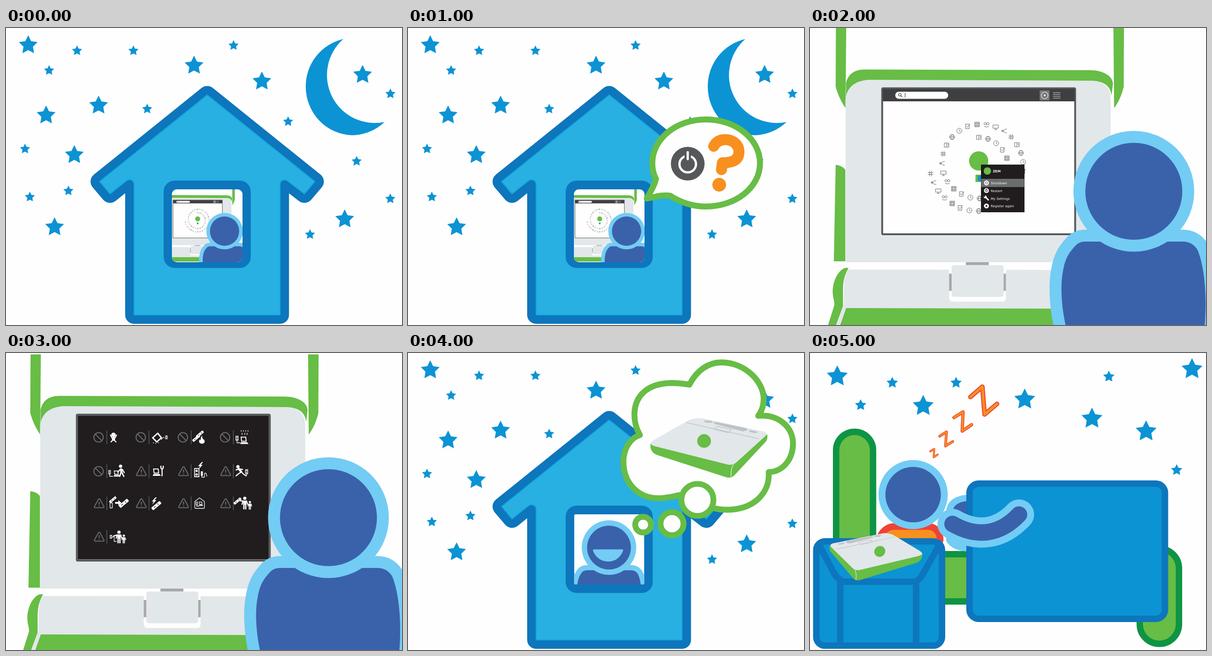
An HTML page for the animation above (6000 ms loop, 864 px wide and 648 px high).

```html
<!DOCTYPE html>
<html lang="en">
<head>
<meta charset="utf-8">
<title>Shutting down at bedtime</title>
<style>
html, body { margin: 0; width: 100%; height: 100%; overflow: hidden; background: #fefefe; }
svg { display: block; width: 100vw; height: 100vh; }
.layer { display: none; }
.line { fill: none; stroke-linecap: round; stroke-linejoin: round; }
.glyph { fill: none; stroke: #64666a; stroke-width: 1; }
.pict { fill: #fff; stroke: none; }
.pict .line { fill: none; stroke: #fff; stroke-width: 1.3; }
.sign { fill: none; stroke: #6b6c6f; stroke-width: 2.1; stroke-linejoin: round; }
.menu text { font: 7.05px "DejaVu Sans", sans-serif; fill: #fff; }
.menu .user { font-weight: bold; }
</style>
</head>
<body>
<svg id="stage" viewBox="0 0 864 648" xmlns="http://www.w3.org/2000/svg"></svg>
<script>
const C = {
  paper: '#fefefe', sky: '#0c93d4', deep: '#0d76bc', wall: '#27b0e1', edge: '#0fa5de',
  green: '#67bd45', leaf: '#0e9444', shell: '#e2e7ea', metal: '#a6a8ab', steel: '#55585b',
  skin: '#3a62ab', halo: '#73ccf4', orange: '#f7901e', red: '#ef4238', black: '#211d1e'
};

const path = (d, fill, stroke = 'none', w = 0) =>
  `<path d="${d}" fill="${fill}" stroke="${stroke}" stroke-width="${w}" stroke-linejoin="round" stroke-linecap="round"/>`;
const circle = (x, y, r, fill, stroke = 'none', w = 0) =>
  `<circle cx="${x}" cy="${y}" r="${r}" fill="${fill}" stroke="${stroke}" stroke-width="${w}"/>`;
const box = (x, y, w, h, r, fill, stroke = 'none', sw = 0) =>
  `<rect x="${x}" y="${y}" width="${w}" height="${h}" rx="${r}" fill="${fill}" stroke="${stroke}" stroke-width="${sw}"/>`;
const move = (x, y, body, more = '') => `<g transform="translate(${x} ${y}) ${more}">${body}</g>`;
const line = (d, attrs = '') => `<path class="line" d="${d}" ${attrs}/>`;

// Stars
function star([x, y], r) {
  let points = '';
  for (let i = 0; i < 10; i++) {
    const a = i * Math.PI / 5, k = i % 2 ? r * .5 : r;
    points += `${(x + k * Math.sin(a)).toFixed(1)},${(y - k * Math.cos(a)).toFixed(1)} `;
  }
  return `<polygon points="${points}" fill="${C.sky}"/>`;
}
const stars = (list, r) => list.map(p => star(p, r)).join('');

const nightStars =
  stars([[48.5,37.4],[410.3,81.9],[558.3,116.5],[778,102.1],[202,169],[87.5,190.5],[149,277],[106,434.5],[739,417.3]], 21.6) +
  stars([[155,49.7],[94,92.7],[278,49.7],[496.5,38.2],[308,176.8],[615.5,204.3],[838.7,143.7],[765,290.8],
         [838.5,372.6],[663.3,450.6],[41.5,263.9],[136.2,355.4],[52,368.6]], 11.6);
const bedStars =
  stars([[59.5,51],[247,115.5],[468.5,101.5],[615.2,143.2],[733.3,171],[833.5,35.3]], 24) +
  stars([[110.5,113.7],[179.5,65],[318.7,65],[652,51.6],[800,255.5]], 13);

// House
const housePath = 'M439 146L674 335L651 362L616 335C608 328 598 332 598 342V626H279.5V342C279.5 332 270 328 262 334L227 362L204 335Z';
const house = path(housePath, C.deep, C.deep, 39) + path(housePath, C.wall, C.edge, 2) +
  box(344, 333, 190, 190.5, 24, C.deep);
const moon = path('M736 24A106 106 0 0 0 654 128A104 106 0 0 0 756 234A104 104 0 0 0 826 205A104.5 104.5 0 0 1 736 24Z', C.sky);

// Laptop seen from the front
const laptop =
  path('M56.5 0H79L77.5 175C69 162 61 147 56 128Z', C.green) +
  path('M662 0H685L684.5 128C680 147 673 162 663.5 175Z', C.green) +
  path('M56 298.5Q70 300 77 309V509H52Z', C.green) +
  path('M77.5 511V160C78 130 95 113 130 113L610 115C640 116 656 125 656 160V511Z', C.shell) +
  path('M78.5 151V120C83 103 94 90.5 120 90.5L610 92C640 92 661 105 661 122L658 147C655 125 640 115 610 115L130 113C100 114 82 128 78.5 151Z', C.green) +
  path('M84 527C74 540 74 560 74 580L73 606L58 648H640V528Z', C.shell) +
  path('M79 611L640 612.5V648H66Z', C.green) +
  path('M84 524C70 518 49 544 49.5 577C50 590 54 596 53 605L39.5 648H57L72 607V575C72 555 74 541 84 524Z', C.green) +
  box(303.5, 517, 124, 80, 8, C.paper) + box(340, 511, 50, 6.5, 0, C.metal) +
  box(303.5, 536, 124, 37.5, 0, C.metal) + box(309, 517.5, 113.5, 69, 5, C.shell) +
  box(157.5, 131.5, 421, 318.5, 2, C.paper, C.steel, 4);

const bodyPath = 'M558 650C548 605 546 560 552 530C557 500 567 488 580 474Q588 466 600 466H813Q835 466 846 485C862 525 866 590 861 650Z';
const viewer = path(bodyPath, C.halo, C.halo, 52) + path(bodyPath, C.skin) +
  circle(706.5, 356.3, 131.8, C.halo) + circle(706.5, 356.3, 105.8, C.skin);

// Home screen: a spiral of small icons
const glyphs = [
  '<path d="M-5-4H0V5H-5ZM0-4H5V5H0M2-1H4M2 1H4"/>',
  '<circle r="5.5"/><path d="M0-3V0L3 2"/>',
  '<path d="M-5-5H5V5H-5ZM-5-2H5M-5 2H5M-2-5V5M2-5V5"/>',
  '<path d="M-6-4H6V3H-6ZM0 3V6M-3 6H3"/>',
  '<path d="M-2-6V6M2-6V6M-6-2H6M-6 2H6"/>',
  '<circle r="5.5"/><ellipse rx="2.5" ry="5.5"/><path d="M-5.5 0H5.5"/>',
  '<path d="M-5-5H3V5H-5ZM-3-1L-1 2L5-5"/>',
  '<circle cx="-3" cy="-2" r="2.5"/><circle cx="3" cy="-2" r="2.5"/><path d="M-5 4Q0 6 5 4"/>',
  '<path d="M-6 0H-2M2-4H6M2 4H6M-2 0L2-4M-2 0L2 4"/><circle cx="-3" r="2"/>'
];
const radii = [[-88,67],[125,67],[203,81.6],[257,93],[306,99],[365,100],[440,94],[490,96],[540,105]];
function radiusAt(a) {
  const i = Math.max(1, radii.findIndex(p => p[0] >= a));
  const [[a0, r0], [a1, r1]] = [radii[i - 1], radii[i]];
  return r0 + (r1 - r0) * (a - a0) / (a1 - a0);
}
function spiral() {
  let out = '', n = 0;
  for (let a = -88; a < 539; n++) {
    const r = radiusAt(a), t = a * Math.PI / 180;
    out += move((366 + r * Math.cos(t)).toFixed(1), (305 + r * Math.sin(t)).toFixed(1), glyphs[n * 5 % 9]);
    a += 20.4 / r * 180 / Math.PI;
  }
  return `<g class="glyph">${out}</g>`;
}
const homeScreen =
  box(159, 133, 418.5, 27, 0, '#3f3e40') + box(186, 139, 115.5, 15.5, 7.7, '#fff') +
  circle(196, 145.5, 2.8, 'none', '#333', 1.1) + line('M198.2 147.7L201 150.5M207.5 142V151', 'stroke="#333" stroke-width="1.1"') +
  box(501, 136, 21.5, 22, 0, '#77797c') + circle(512, 147, 7.3, 'none', '#fff', 1.1) + circle(512, 147, 2, '#fff') +
  line('M530.5 141H546M530.5 145H546M530.5 149H546M530.5 153H546', 'stroke="#ddd" stroke-width="1.1"') +
  spiral() + circle(368, 290, 21, C.green) +
  box(361, 320, 14, 16, 1, C.green) + box(366, 322, 8, 12, 0, C.sky);

const item = (label, y) => `<text x="394.5" y="${y}">${label}</text>`;
const menu = '<g class="menu">' +
  box(373, 298, 95, 104, 0, C.black) + box(373.5, 329, 94, 18, 0, '#6b6d6f') +
  circle(387, 312, 8, C.green) + '<text class="user" x="399" y="315">ZEM</text>' +
  item('Shutdown', 341) + item('Restart', 357.5) + item('My Settings', 374.5) + item('Register again', 391.3) +
  circle(385, 338, 5.4, '#fff') + circle(385, 338, 2.6, 'none', '#555', 1) +
  circle(385, 354.7, 5.4, '#fff') + circle(385, 354.7, 2.6, 'none', C.black, 1) + box(384.5, 351, 1, 4, 0, C.black) +
  line('M383 369L389 375', 'stroke="#fff" stroke-width="3"') + circle(382.3, 368.5, 3.1, '#fff') + circle(380.8, 367, 1.4, C.black) +
  circle(385, 388.3, 5.4, '#fff') + circle(385, 388.3, 2, C.black) + '</g>';

// Safety screen pictograms
const pc = (x, y, s = 1) => move(x, y, line('M-6-7H4L5 2H-5Z', 'style="stroke-width:2"') + '<path d="M-6 4H7L10 8H-8Z"/>', `scale(${s})`);
const outlet = (x, y, s = 1) => move(x, y, line('M-2.5-4.5H2.5V4.5H-2.5Z') +
  '<circle cy="-2" r="1.3"/><circle cy="2" r="1.3"/>', `scale(${s})`);
const cell = (x, y, s = 1) => move(x, y, '<rect x="-12" y="-3.5" width="24" height="7" rx="1.5"/>' +
  `<path d="M-7 0H-2M5-2V2" stroke="${C.black}" stroke-width="1.3"/>`, `rotate(-40) scale(${s})`);
const bolt = (x, y) => move(x, y, '<path d="M3-8L-5 1H-1L-4 8L5-2H1L6-8Z"/>');
const limb = (d, w = 2.4) => line(d, `style="stroke-width:${w}"`);
const adult = (x, y, s = 1) => move(x, y, '<circle cy="-10" r="3.6"/><path d="M-3.5-5H3.5V4H-3.5Z"/>' +
  limb('M-4-4L-6 3M4-4L6 3') + limb('M-2 4V13M2 4V13', 2.8), `scale(${s})`);
const pictograms =
  '<circle cx="234.5" cy="178.5" r="4.8"/><ellipse cx="234.5" cy="187" rx="3.6" ry="4.5"/>' +
  limb('M231 185L228 179M238 185L241 179M233 190L229 194M236 190L240 194') +
  limb('M331 175L339 185L329 194L320 185Z', 3) + line('M339 189Q343 182 345 185M321 196H322M326 197H327M332 196H333') + outlet(350, 184, .8) +
  cell(415, 186, .8) + cell(423, 177, .8) + '<path d="M428 180Q427 187 433 190Q435 198 427 198Q419 197 422 189L425 190Q424 185 428 180Z"/>' +
  line('M513 169V171M518 169V171M523 169V171M528 169V171M515 175V178M521 175V178M526 175V178') + outlet(504, 186) + pc(519, 190.5) + line('M504 191V196H511') +
  outlet(226, 260, .85) + line('M226 265V269H233') + pc(241, 263, .8) +
  '<circle cx="250" cy="247" r="3.6"/>' + limb('M251 254L252 260', 5) + limb('M249 254L244 260M254 254L258 261') + limb('M251 261L248 269M253 261L257 269', 2.8) +
  pc(328, 260) + limb('M340.5 253V268M338 247V251L340.5 254L343 251V247') +
  limb('M411.5 252H421V270H411.5Z', 1.8) + '<circle cx="416" cy="257" r="2.6"/><circle cx="416" cy="265" r="2.6"/>' +
  bolt(424, 246) + '<rect x="425" y="258" width="4.5" height="10" rx="1"/>' + line('M427 268V271H433V263Q437 259 438 269') +
  '<circle cx="506" cy="248" r="3.6"/>' + limb('M508 253L513 259', 4.5) + limb('M513 260L508 263L502 268M514 260L519 265L524 268M502 255L508 253L516 254') + outlet(525, 259) + line('M525 264V267') +
  cell(233, 320, .75) + line('M227 327V338H232V327Z') + '<path d="M238 325H245V321L252 327L245 333V329H238Z"/>' + cell(257, 328) +
  bolt(323, 323) + cell(328, 333) +
  line('M412 324L422 316L433 324V337Q433 339 431 339H414Q412 339 412 337Z') + outlet(416.5, 328, .7) + pc(425, 329, .55) + line('M416 332V334H421') +
  cell(505, 323, .8) + adult(521, 327) + limb('M517 323L510 322') + adult(532, 332, .68) +
  outlet(229, 401, .8) + line('M232 401H236V411H241') + adult(246.5, 401) + limb('M243 397L235 399') + adult(257, 405.5, .7);

function signs() {
  let out = '';
  for (let n = 0; n < 13; n++) {
    const x = 202 + n % 4 * 92, y = [184, 258, 328, 401][n >> 2];
    out += n < 5
      ? move(x, y, '<circle r="10.3"/><path d="M-7.2-7.2L7.2 7.2"/>')
      : move(x + 1.3, y, '<path d="M-1.6-9L-10.3 7Q-11 9.5-9 9.5H9Q11 9.5 10.3 7L1.6-9Q0-11-1.6-9ZM0-3.5V3M0 5.2V7"/>');
    out += `<path d="M${x + 18} ${y - 15}V${y + 15}" stroke-width="1.2"/>`;
  }
  return `<g class="sign">${out}</g>`;
}
const safetyScreen = box(156.5, 136.5, 417, 314, 0, C.black) + signs() + `<g class="pict">${pictograms}</g>`;

// Bubbles
const question =
  path('M650 199.5C715 199.5 768 242 768 295C768 348 715 389.5 650 389.5C618 389.5 594 380 572 366C555 363 538 369 521 372C528 358 537 347 541 329C535 318 533 305 533 295C533 242 585 199.5 650 199.5Z', C.paper, C.green, 13) +
  circle(610.3, 296, 36.8, C.steel) + circle(610.3, 297, 18, 'none', '#fff', 5) +
  path('M610.3 272V287', 'none', C.steel, 14) + path('M610.3 271V286', 'none', '#fff', 5) +
  path('M667 258C672 249 680 243.5 692 243.5C711 243.5 722 256 722 270C722 290 705 294 686 294L684 309', 'none', C.orange, 24) +
  circle(679, 342, 15, C.orange);

const closedLaptop =
  path('M529 198Q527 217 545 223L694 271Q705 274 712 267L781 193Q785 188 784 178L700 200L560 190Z', C.green) +
  path('M529 197Q533 191 545 185L608 149Q622 141 640 142L775 171Q786 174 780 181L716 239Q708 246 696 243L541 204Q531 202 529 197Z', C.shell) +
  path('M710 244Q704 252 705 269', 'none', '#fff', 1.2) +
  path('M608 152L765 187M667 166L675 160L706 167L699 174Z', 'none', '#c2c5c7', 1.3) +
  path('M644 147L662 148L666 152L650 152ZM669 150L738 164L741 169L730 171L667 154ZM746 168L764 172L758 175L744 172Z', '#bfc2c5') +
  circle(646, 192, 15, C.green);

const thought =
  path('M614 69C630 38 655 20.5 684 20.5C735 20.5 776 62 776 100C776 115 772 127 764 137C810 133 840 163 840 197C840 232 818 259 787 260C790 305 755 342 695 342C670 342 650 335 632 320L592 310C575 314 560 317 547 317C500 317 470 282 470 237C470 210 484 186 506 179C498 165 494 150 494 135C494 93 523 66 575 65.5C590 65.5 602 67 614 69Z', C.paper, C.green, 12.8) +
  circle(631.5, 320.5, 35, C.paper, C.green, 12.5) + circle(576, 372.5, 25.2, C.paper, C.green, 13) +
  circle(513, 374.5, 17.2, C.paper, C.green, 12.8) + closedLaptop;

// Window contents
const watching = '<g clip-path="url(#pane)">' + box(362, 352, 154, 159, 0, C.paper) +
  `<g transform="matrix(.256 0 0 .26 324 341)">${laptop + homeScreen}</g>` +
  `<g transform="matrix(.302 0 0 .302 263.5 335.6)">${viewer}</g></g>`;
const smallBody = 'M369 508Q371 488 380 478Q384 474 392 474H487Q495 474 500 480Q506 488 508 508Z';
const smiling = '<g clip-path="url(#square)">' + box(362.5, 352, 153, 153, 2, C.paper) +
  path(smallBody, C.halo, C.halo, 23) + path(smallBody, C.skin) +
  circle(438.5, 424.5, 59.5, C.halo) + circle(438.5, 424.5, 47.8, C.skin) +
  path('M405 428.5H468Q470 428.5 469 432C463 447 451 455 437 455C422 455 409 446 404 432Q403 428.5 405 428.5Z', C.halo) + '</g>';

// Bedroom
const zed = (d, w) => path(d, 'none', C.red, w) + path(d, 'none', C.orange, w * .56);
const armPath = 'M311 373C365 404 415 396 456 352.5';
const bedroom = bedStars +
  box(57, 172, 80.5, 330, 40, C.green, C.leaf, 14) +
  box(200, 439, 220, 103, 0, C.green, C.leaf, 14) +
  box(719.5, 427, 85.5, 207.5, 42.7, C.green, C.leaf, 14) +
  path('M150 410C155 388 170 378.5 185 378.5H258C274 378.5 284 392 284 408Q282 416 276 420H150Z', C.orange, C.red, 14.5) +
  path('M345 309Q300 312 297 345V410Q310 432 345 433Z', C.halo) + path('M345 323Q312 325 311 348V360H345Z', C.skin) +
  circle(225, 309, 75.5, C.halo) + circle(225, 309, 60.5, C.skin) +
  box(348, 285, 426.5, 295, 20, C.sky, C.deep, 14) +
  path(armPath, 'none', C.halo, 66) + path(armPath, 'none', C.skin, 36) +
  box(13.7, 411, 274.3, 227.5, 19, C.sky, C.deep, 14) +
  path('M20 419L51 478Q58 492 72 499H228Q236 497 243 488L282 419M66 638V499M231.5 638V499', 'none', C.deep, 14) +
  `<g transform="matrix(-.798 -.0067 -.063 .796 679.8 284.4)">${closedLaptop}</g>` +
  zed('M350 96L376 73.5L381 134L408 111', 10) + zed('M314 141L334 128.5L332 170.5L352.5 156.5', 7) +
  zed('M283 181.5L298 172L295.5 203L311.5 193', 5.8) + zed('M262.5 214.5L271 209.5L270 227.5L278.5 221.5', 4.4);

// Each layer lists the scenes in which it is shown
const layers = [
  [[0, 1, 4], nightStars], [[0, 1], moon], [[0, 1, 4], house],
  [[0, 1], watching], [[1], question], [[4], smiling + thought],
  [[2], laptop + homeScreen + menu + viewer],
  [[3], move(-3, 3, laptop) + safetyScreen + move(-3, 3, viewer)],
  [[5], bedroom]
];
const stage = document.getElementById('stage');
stage.innerHTML = '<defs><clipPath id="pane"><rect x="362" y="352" width="154" height="159" rx="11"/></clipPath>' +
  '<clipPath id="square"><rect x="362.5" y="352" width="153" height="153" rx="2"/></clipPath></defs>' +
  layers.map(([, body]) => `<g class="layer">${body}</g>`).join('');

const groups = [...stage.querySelectorAll('.layer')];
const start = performance.now();
let shown = -1;
function draw() {
  const scene = Math.floor((performance.now() - start) / 1000) % 6;
  if (scene !== shown) {
    shown = scene;
    groups.forEach((g, i) => g.style.display = layers[i][0].includes(scene) ? 'inline' : 'none');
  }
  requestAnimationFrame(draw);
}
draw();
</script>
</body>
</html>
```
